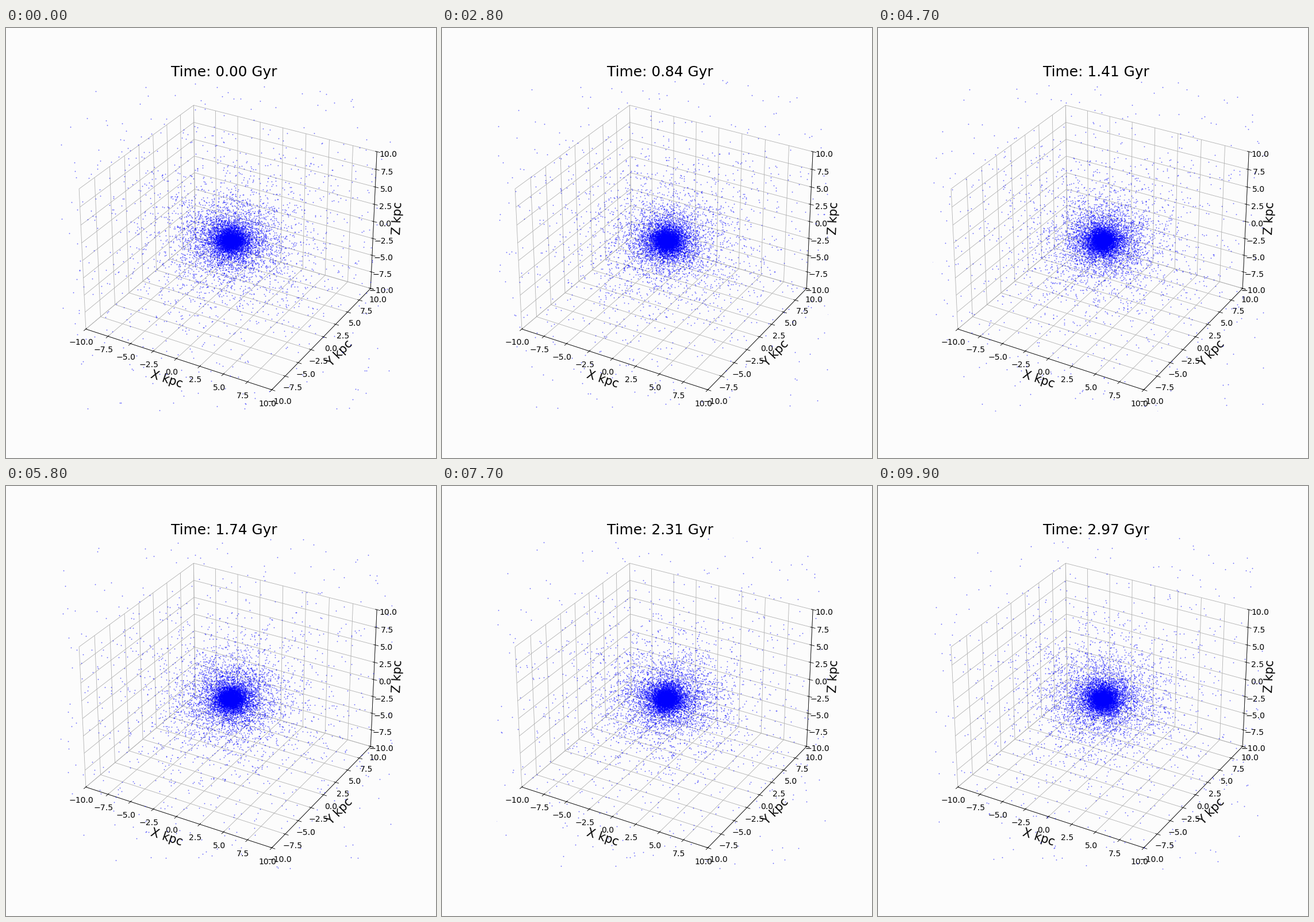
A matplotlib script that plays this animation: 748x748 px, repeating every 10000 ms.

```python
import numpy as np
import matplotlib.pyplot as plt
from matplotlib.animation import FuncAnimation

SIZE, INCHES = 748, 10
FRAMES, STEP_GYR, SUBSTEPS = 100, 0.03, 6
N, CORE, R_MAX = 10000, 0.85, 25.0  # stars, kpc, kpc
GM = 230.0  # kpc^3 / Gyr^2
PAPER = "#fcfcfc"

rng = np.random.default_rng(12)


def directions(n):
    v = rng.normal(size=(n, 3))
    return v / np.linalg.norm(v, axis=1, keepdims=True)


def hernquist_cluster():
    """Positions and virialised velocities of a truncated Hernquist sphere."""
    root = np.sqrt(rng.random(N)) * R_MAX / (R_MAX + CORE)
    r = CORE * root / (1 - root)
    # A mean of 1/4 for (speed / escape speed)^2 puts the system in virial balance
    speed = np.sqrt(rng.beta(1.5, 4.5, N) * 2 * GM / (r + CORE))
    return directions(N) * r[:, None], directions(N) * speed[:, None]


def gravity(p):
    r = np.linalg.norm(p, axis=1, keepdims=True) + 1e-6
    return -GM * p / (r * (r + CORE) ** 2)


def simulate():
    """Leapfrog orbits, one snapshot per frame."""
    pos, vel = hernquist_cluster()
    dt = STEP_GYR / SUBSTEPS
    snaps = [pos.copy()]
    for _ in range(FRAMES - 1):
        for _ in range(SUBSTEPS):
            pos += vel * dt / 2
            vel += gravity(pos) * dt
            pos += vel * dt / 2
        snaps.append(pos.copy())
    return snaps


snaps = simulate()

plt.rcParams["font.family"] = "DejaVu Sans"
fig = plt.figure(figsize=(INCHES, INCHES), dpi=SIZE / INCHES, facecolor=PAPER)
ax = fig.add_subplot(projection="3d", facecolor=PAPER)
ax.set(xlim=(-10, 10), ylim=(-10, 10), zlim=(-10, 10))
for axis, name in zip((ax.xaxis, ax.yaxis, ax.zaxis), "XYZ"):
    axis.set_pane_color((1, 1, 1, 0))
    axis.set_label_text(f"{name} kpc", fontsize=20)
    axis.set_tick_params(labelsize=13.5)

title = fig.text(379.4 / SIZE, 1 - 83.6 / SIZE, "", fontsize=24, ha="center")
stars, = ax.plot([], [], [], "o", color="blue", ms=1.75, mew=0, alpha=0.6)


def update(i):
    stars.set_data_3d(*snaps[i].T)
    title.set_text(f"Time: {i * STEP_GYR:.2f} Gyr")
    return stars, title


anim = FuncAnimation(fig, update, frames=FRAMES, interval=100,
                     repeat=True, cache_frame_data=False)
plt.show()
```
